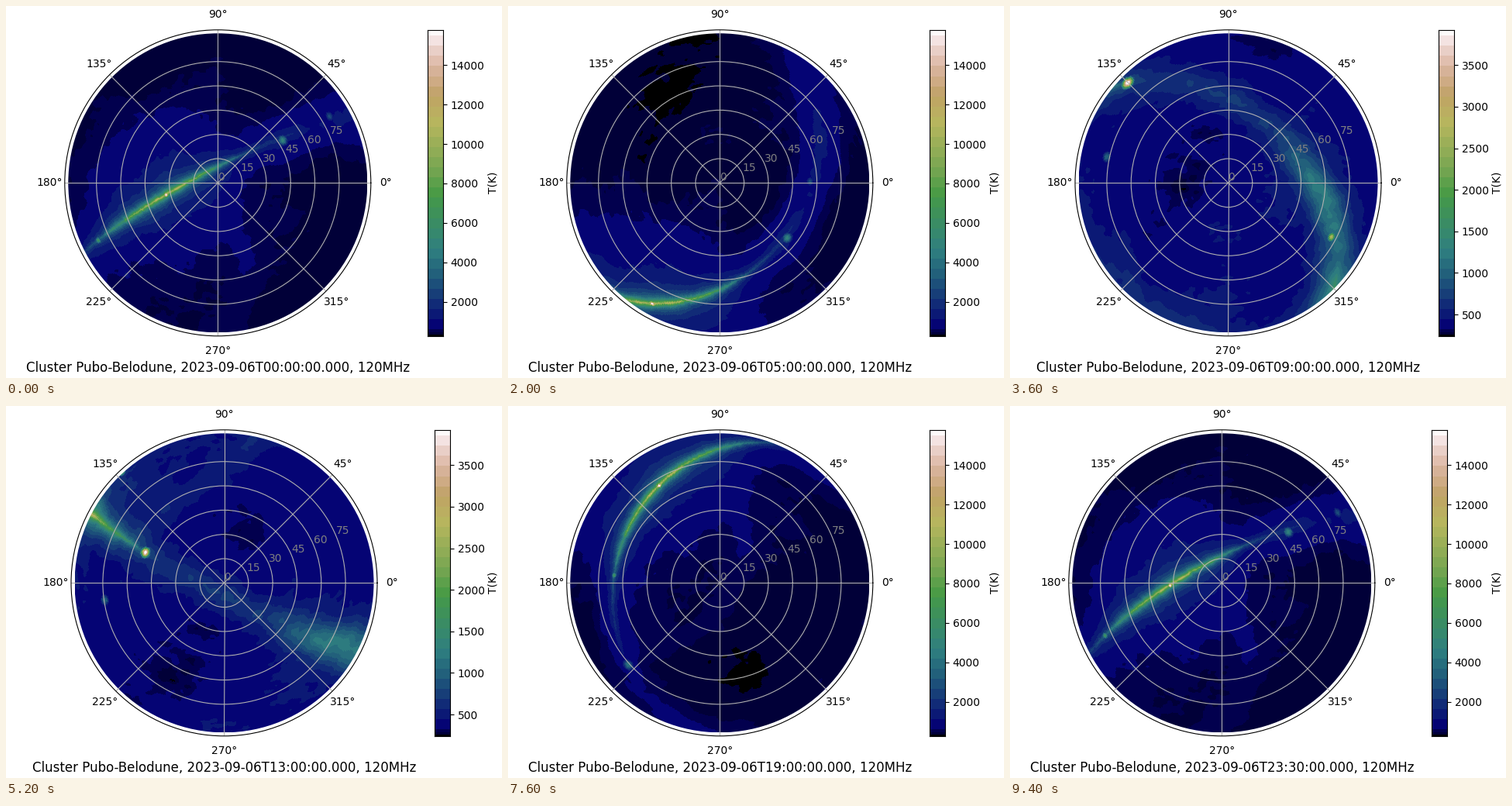
These frames come from a looping animation (640 px wide and 480 px high, 9600 ms). A matplotlib script:

```python
import numpy as np
import matplotlib.pyplot as plt
from matplotlib.animation import FuncAnimation
from matplotlib.colors import ListedColormap

W, H, DPI = 640, 480, 100
FRAMES = 48
CY, RIM, DISK = 228.3, 197.5, 193
RMAX = 94.6
PX_PER_DEG = RIM / RMAX
LAT = np.radians(3)
LST_START, LST_STEP = 274.4, 7.5205   # degrees of sidereal time per half hour
CELLS = 2                             # sky map cells per degree

plt.rcParams["font.family"] = "DejaVu Sans"


def unit(lon, lat):
    lon, lat = np.radians(lon), np.radians(lat)
    return np.stack([np.cos(lat) * np.cos(lon),
                     np.cos(lat) * np.sin(lon),
                     np.sin(lat) + 0 * lon], -1)


POLE, CENTER = unit(192.86, 27.13), unit(266.4, -28.94)
TO_GALACTIC = np.stack([CENTER, np.cross(POLE, CENTER), POLE])


def bell(x, width, power=2):
    return np.exp(-(np.abs(x) / width) ** power)


def angle_to(vec, center):
    return np.degrees(np.arccos(np.clip(vec @ center, -1, 1)))


def ripple(vec, rng, low, high, count):
    """Sum of random plane waves, scaled to unit spread."""
    total = np.zeros(vec.shape[:2])
    for freq in np.geomspace(low, high, count):
        way = rng.normal(size=3)
        way *= freq / np.linalg.norm(way)
        total += np.sin(vec @ way + rng.uniform(0, 6.3)) / freq ** .45
    return total / total.std()


def build_sky():
    rng = np.random.default_rng(7)
    ra = (np.arange(360 * CELLS) + .5) / CELLS
    dec = (np.arange(180 * CELLS) + .5) / CELLS - 90
    vec = unit(*np.meshgrid(ra, dec))
    gal = vec @ TO_GALACTIC.T
    lon = np.degrees(np.arctan2(gal[..., 1], gal[..., 0]))
    lat = np.degrees(np.arcsin(np.clip(gal[..., 2], -1, 1)))
    soft = ripple(vec, rng, 4, 90, 36)
    fine = ripple(vec, rng, 30, 130, 24)

    # background: warm centre, two cold regions, a faint northern loop
    sky = 400 + 500 * bell(angle_to(vec, CENTER), 45)
    sky -= 95 * bell(angle_to(vec, unit(145, 18)), 30)
    sky -= 95 * bell(angle_to(vec, unit(52, -32)), 28)
    loop = bell(angle_to(gal, unit(329, 17.5)) - 56, 7)
    sky += 150 * loop * np.clip(lat / 20, 0, 1)

    # wide band of the outer plane
    sky += (300 + 450 * bell(lon - 120, 40)) * bell(lat, 10)
    sky *= 1 + .075 * soft + .02 * fine

    # bright inner ridge with its halo
    ridge = 11000 * bell(lon, 44, 2.2) + 1000 * bell(np.abs(lon) - 75, 15)
    thin = .72 * bell(lat, 1.6, 1) * (1 - .15 * np.abs(fine))
    halo = .2 * bell(lat, 5, 1) + .06 * bell(lat, 13, 1)
    sky += ridge * (thin + halo * (1 + .1 * soft))

    def spot(ra, dec, peak, width):
        glow = peak * bell(angle_to(vec, unit(ra, dec)), width)
        np.maximum(sky, np.minimum(1.05 * glow, peak), out=sky)

    spot(266.2, -28.7, 15790, 1.4)
    spot(307, 41, 4800, 2.8)
    spot(350.8, 58.8, 2700, 2.2)
    spot(133.5, -45, 3924, 2.6)
    spot(208, -62, 6364, 1.5)
    spot(86, -70, 1000, 2.8)
    spot(201, -43, 1600, 1.8)
    return np.clip(sky, 245, 15790)


def horizon_grid():
    """Declination rows, hour angles and above-horizon mask per pixel."""
    side = np.arange(2 * DISK) + .5 - DISK
    x, y = np.meshgrid(side, -side)
    deg = np.hypot(x, y) / PX_PER_DEG
    zen = np.radians(np.minimum(deg, DISK / PX_PER_DEG))
    az = np.arctan2(y, x)
    north = np.sin(zen) * np.cos(az)
    dec = np.arcsin(np.sin(LAT) * np.cos(zen) + np.cos(LAT) * north)
    hour = np.arctan2(-np.sin(az) * np.sin(zen),
                      np.cos(zen) * np.cos(LAT) - np.sin(LAT) * north)
    rows = ((np.degrees(dec) + 90) * CELLS).astype(int)
    return np.clip(rows, 0, 180 * CELLS - 1), np.degrees(hour), deg <= 90


SKY = build_sky()
ROWS, HOUR, ABOVE = horizon_grid()

# colour steps as fractions of the range, finer at the dark end
EDGES = np.r_[0, .004, .012, .022, np.linspace(.055, .983, 29), 1]
SHADES = (EDGES[:-1] + EDGES[1:]) / 2
SHADES[0], SHADES[-1] = 0, 1
CMAP = ListedColormap(plt.get_cmap("gist_earth")(SHADES))
TOP_STEP = len(SHADES) - 1


def steps(fraction):
    return np.clip(np.digitize(fraction, EDGES) - 1, 0, TOP_STEP)


def place(ax, left, top, width, height):
    ax.set_position([left / W, 1 - (top + height) / H, width / W, height / H])


fig = plt.figure(figsize=(W / DPI, H / DPI), dpi=DPI, facecolor="white")

sky_ax = fig.add_axes([0, 0, 1, 1], label="sky")
sky_ax.axis("off")
image_style = dict(cmap=CMAP, vmin=0, vmax=TOP_STEP, interpolation="nearest",
                   aspect="auto")
sky_im = sky_ax.imshow(np.zeros(HOUR.shape), extent=(-1, 1, -1, 1),
                       **image_style)
sky_im.set_clip_path(plt.Circle((0, 0), 1, transform=sky_ax.transData))

polar = fig.add_axes([0, 0, 1, 1], projection="polar", facecolor="none")
polar.set_ylim(0, RMAX)
polar.set_yticks(range(0, 90, 15))
polar.tick_params(axis="y", labelcolor="gray")

bar_ax = fig.add_axes([0, 0, 1, 1], label="bar")
bar_ax.set_xticks([])
bar_ax.yaxis.tick_right()
bar_im = bar_ax.imshow(steps(np.linspace(0, 1, 790))[:, None], origin="lower",
                       **image_style)
fig.text(629 / W, 1 - CY / H, "T(K)", rotation=90, ha="center", va="center",
         fontsize=10)
caption = fig.text(0, 1 - 472 / H, "", ha="center", va="baseline", fontsize=12)


def draw(k):
    lst = LST_START + LST_STEP * k
    cols = (((lst - HOUR) % 360) * CELLS).astype(int) % (360 * CELLS)
    view = SKY[ROWS, cols]
    high = view[ABOVE].max()
    wide = high >= 10000   # five-digit labels push the dial to the left
    low = 262 if wide else 242
    cx = 273.3 if wide else 281.5

    place(sky_ax, cx - DISK, CY - DISK, 2 * DISK, 2 * DISK)
    place(polar, cx - RIM, CY - RIM, 2 * RIM, 2 * RIM)
    place(bar_ax, 544.3 if wide else 553.3, CY - RIM, 19.75, 2 * RIM)

    sky_im.set_data(steps((view - low) / (high - low)))
    bar_im.set_extent((0, 1, low, high))
    bar_ax.set_ylim(low, high)
    caption.set_x(cx / W)
    caption.set_text(f"Cluster Pubo-Belodune, 2023-09-06T{k // 2:02d}:"
                     f"{k % 2 * 30:02d}:00.000, 120MHz")
    return sky_im, bar_im, caption


anim = FuncAnimation(fig, draw, frames=FRAMES, interval=200, repeat=True,
                     repeat_delay=0, blit=False)
plt.show()
```
